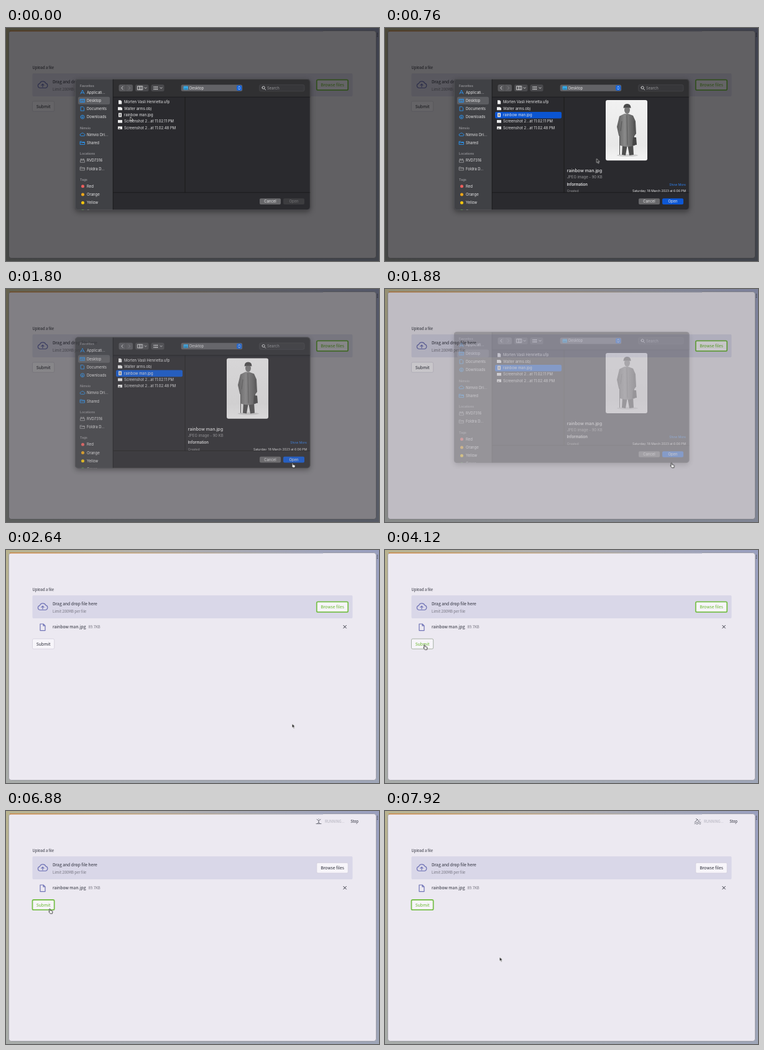
These frames come from a looping animation (600 px wide and 375 px high, 8 s). An HTML page:

```html
<!DOCTYPE html>
<html lang="en">
<head>
<meta charset="utf-8">
<title>File upload</title>
<style>
html, body { margin: 0; width: 100%; height: 100%; overflow: hidden; background: #b4b2ae; }
svg { display: block; width: 100%; height: 100%; }
text { white-space: pre; }

.page text { font: 6.75px "Noto Sans CJK JP", "Noto Sans CJK SC", "Noto Sans CJK", Lato, sans-serif; fill: #282a36; }
.page text.small { font-size: 5.91px; }
.page text.muted { fill: #74737f; }
.line { fill: none; stroke-linecap: round; stroke-linejoin: round; }
.violet { stroke: #6f73b6; stroke-width: 1.2; }
.button { fill: #f7f5fa; stroke: #cecbd8; stroke-width: .7; }

.dialog text { font: 5.95px Inter, "Open Sans", sans-serif; fill: #e6e6e7; }
.dialog text.head { font-size: 5.1px; font-weight: 600; fill: #929296; }
.dialog text.info { font-size: 5px; }
.dialog text.dim { fill: #98989b; }
.blue { stroke: #2c94ee; stroke-width: .9; }
.grey { stroke: #a0a0a3; stroke-width: .8; }
.pale { stroke: #dededf; stroke-width: .9; }

/* One loop is 8 s, so 1% is 80 ms. */
.step { animation: 8s step-end infinite; }
.picked { animation-name: picked; }
.unpicked { animation-name: unpicked; }
.uploaded { animation-name: uploaded; }
.pushed { animation-name: pushed; }
.submit-box { animation-name: submit-box; }
.page .submit-text { animation-name: submit-text; }
.browse-box { animation-name: browse-box; }
.page .browse-text { animation-name: browse-text; }
.running { animation-name: running; }
.arrow { animation-name: arrow; }
.hand { animation-name: hand; }
.shade { animation: shade 8s linear infinite; }
.dialog { animation: dialog 8s linear infinite; }
.cursor { animation: cursor 8s ease-in-out infinite; }
.sport { visibility: hidden; animation: sport .8s step-end infinite; }

@keyframes picked { 0% { visibility: hidden } 4%, 100% { visibility: visible } }
@keyframes unpicked { 0% { visibility: visible } 4%, 100% { visibility: hidden } }
@keyframes uploaded { 0% { visibility: hidden } 28%, 100% { visibility: visible } }
@keyframes pushed { 0% { transform: none } 28%, 100% { transform: translateY(25px) } }
@keyframes submit-box {
  0% { stroke: #cecbd8; stroke-width: .7px }
  50% { stroke: #95a191; stroke-width: .8px }
  56%, 100% { stroke: #79c04b; stroke-width: 1.8px }
}
@keyframes submit-text { 0% { fill: #282a36 } 50%, 100% { fill: #68b82b } }
@keyframes browse-box {
  0% { stroke: #79c04b; stroke-width: 1.8px }
  56%, 100% { stroke: #cecbd8; stroke-width: .7px }
}
@keyframes browse-text { 0% { fill: #68b82b } 56%, 100% { fill: #282a36 } }
@keyframes running { 0% { visibility: hidden; opacity: 0 } 63%, 100% { visibility: visible; opacity: 1 } }
@keyframes sport { 0% { visibility: inherit } 20%, 100% { visibility: hidden } }
@keyframes shade { 0%, 22% { opacity: .59 } 24.25%, 100% { opacity: 0 } }
@keyframes dialog {
  0%, 22% { opacity: 1; transform: none }
  24.25%, 100% { opacity: 0; transform: translateY(-19.5px) }
}
@keyframes cursor {
  0%, 5.5% { transform: translate(200px, 143px); animation-timing-function: ease-in }
  10.5% { transform: translate(402px, 240px); animation-timing-function: ease-out }
  17.5%, 42% { transform: translate(460.3px, 279.7px) }
  51%, 84.5% { transform: translate(63px, 152.5px) }
  93.5%, 100% { transform: translate(184.4px, 235.2px) }
}
@keyframes arrow {
  0% { visibility: visible } 15% { visibility: hidden } 25% { visibility: visible }
  50% { visibility: hidden } 86.5%, 100% { visibility: visible }
}
@keyframes hand {
  0% { visibility: hidden } 15% { visibility: visible } 25% { visibility: hidden }
  50% { visibility: visible } 86.5%, 100% { visibility: hidden }
}
</style>
</head>
<body>
<svg viewBox="0 0 600 375" preserveAspectRatio="none">
  <defs>
    <linearGradient id="desk">
      <stop offset="0" stop-color="#b9b38f"/><stop offset=".35" stop-color="#b2b0ab"/>
      <stop offset="1" stop-color="#999fbf"/>
    </linearGradient>
    <linearGradient id="desk-low" x2="0" y2="1">
      <stop offset="0" stop-color="#a0a8b4" stop-opacity="0"/><stop offset="1" stop-color="#a0a8b4" stop-opacity=".7"/>
    </linearGradient>
    <linearGradient id="strip">
      <stop offset="0" stop-color="#c9823f"/><stop offset=".3" stop-color="#c29a62"/>
      <stop offset=".8" stop-color="#aba9a8"/><stop offset="1" stop-color="#a5a7bb"/>
    </linearGradient>
    <linearGradient id="photo" x2="0" y2="1">
      <stop offset="0" stop-color="#f1f1f1"/><stop offset=".75" stop-color="#e8e8e8"/>
      <stop offset="1" stop-color="#f4f4f4"/>
    </linearGradient>
    <linearGradient id="coat">
      <stop offset="0" stop-color="#5d5d5d"/><stop offset=".4" stop-color="#8a8a8a"/>
      <stop offset="1" stop-color="#505050"/>
    </linearGradient>
    <filter id="shadow" x="-10%" y="-10%" width="120%" height="130%">
      <feDropShadow dx="0" dy="3" stdDeviation="4" flood-opacity=".4"/>
    </filter>
    <clipPath id="panel"><rect x="111" y="82" width="378.500" height="211" rx="5"/></clipPath>
    <clipPath id="content"><rect x="172" y="111" width="318" height="153.500"/></clipPath>
  </defs>

  <g class="page">
    <rect width="600" height="375" fill="url(#desk)"/>
    <rect width="600" height="375" fill="url(#desk-low)"/>
    <rect x="4.500" y="4.500" width="591" height="366" rx="4" fill="#ece9f1" stroke="#8d8d94" stroke-width=".7"/>
    <rect x="6" y="4" width="504" height="1.500" fill="url(#strip)"/>
    <g fill="#44464f"><circle cx="597.500" cy="8.500" r=".8"/><circle cx="597.500" cy="11" r=".8"/><circle cx="597.500" cy="13.500" r=".8"/></g>

    <text class="small" x="42.500" y="65.500">Upload a file</text>
    <rect x="42.500" y="73" width="515" height="37" rx="2" fill="#d9d7e8"/>
    <path class="line violet" d="M54.500 96.500a3.600 3.600 0 0 1-.2-7.100a5.200 5.200 0 0 1 9.700-.5a3.900 3.900 0 0 1-.3 7.600zM59 95v-4.600M57 92.200l2-2 2 2"/>
    <text x="75" y="88.800">Drag and drop file here</text>
    <text class="small muted" x="75" y="100.700">Limit 200MB per file</text>
    <rect class="button step browse-box" x="499.800" y="83.300" width="50.400" height="16.600" rx="2"/>
    <text class="step browse-text" x="525" y="94" text-anchor="middle">Browse files</text>

    <g class="step uploaded">
      <path class="line violet" d="M55 119h5l3 3v7.600h-8zM60 119v3h3"/>
      <text x="75" y="126.400">rainbow man.jpg</text>
      <text class="small muted" x="132.500" y="126.200">89.7KB</text>
      <path class="line" stroke="#30323d" d="M542.800 121.300l4.600 4.600m0-4.600l-4.600 4.600"/>
    </g>

    <g class="step pushed">
      <rect class="button step submit-box" x="42.500" y="118" width="35.200" height="16.200" rx="2"/>
      <text class="step submit-text" x="60.200" y="128.500" text-anchor="middle">Submit</text>
    </g>

    <g class="step running">
      <g class="line" stroke="#6f707b" stroke-width="1" id="sports"></g>
      <text class="small" x="513" y="19" style="fill:#aeadb9">RUNNING...</text>
      <text class="small" x="554.300" y="19">Stop</text>
    </g>
  </g>

  <rect class="shade" width="600" height="375"/>

  <g class="dialog">
    <rect x="111" y="82" width="378.500" height="211" rx="5" fill="#2b2b2d" filter="url(#shadow)"/>
    <g clip-path="url(#panel)">
      <rect x="111" y="82" width="61" height="211" fill="#404145"/>
      <rect x="172" y="82" width="318" height="29" fill="#303032"/>
      <path d="M172 111.200h318M172 264.800h318M288 111v154M172.200 82v211" stroke="#171718" stroke-width=".8"/>
      <rect x="116" y="110.700" width="51" height="12.400" rx="2.500" fill="#5c5d61"/>
      <g id="sidebar"></g>
    </g>
    <rect x="111.300" y="82.300" width="377.900" height="210.400" rx="5" fill="none" stroke="#606063" stroke-width=".6"/>

    <rect x="181.500" y="91" width="22.500" height="11" rx="2.500" fill="#58585b"/>
    <path class="line pale" d="M188 94.200l-2.200 2.300 2.200 2.300"/>
    <path class="line" stroke="#858588" stroke-width=".9" d="M197.500 94.200l2.200 2.300-2.200 2.300"/>
    <path d="M192.800 91v11" stroke="#444446" stroke-width=".6"/>
    <g fill="#49494c"><rect x="208" y="91" width="21.500" height="11" rx="2.500"/><rect x="233.500" y="91" width="21" height="11" rx="2.500"/></g>
    <path class="line pale" d="M211.800 93.700h8v5.600h-8zM214.500 93.700v5.600m2.600-5.600v5.600M223 95.800l1.500 1.500 1.500-1.500M248 95.800l1.500 1.500 1.500-1.500"/>
    <path d="M237.500 95h7M237.500 98.300h7" stroke="#dededf" stroke-width="1.700" stroke-dasharray="1.700 .8"/>
    <rect x="281.700" y="91.300" width="98.500" height="10.400" rx="2.500" fill="#626266"/>
    <rect x="285.500" y="93.500" width="7.500" height="6" rx="1" fill="#36a7e4"/>
    <path d="M286.500 98h5.500" stroke="#176c9f"/>
    <text x="295" y="98.600">Desktop</text>
    <rect x="371" y="92.300" width="8.300" height="8.400" rx="2" fill="#1463db"/>
    <path class="line" stroke="#fff" stroke-width=".8" d="M373.700 95.500l1.500-1.500 1.500 1.500M373.700 97.500l1.500 1.500 1.500-1.500"/>
    <rect x="407.500" y="91.300" width="72.500" height="10.500" rx="2.500" fill="#37373a" stroke="#4b4b4e" stroke-width=".6"/>
    <path class="line pale" d="M412 96a2.100 2.100 0 1 0 4.200 0a2.100 2.100 0 1 0-4.200 0M415.700 97.700l1.900 1.900"/>
    <text class="dim" x="420" y="98.700">Search</text>

    <rect class="step picked" x="177" y="135" width="107" height="10.600" rx="2" fill="#0b55d1"/>
    <g id="files"></g>

    <g class="step picked" clip-path="url(#content)">
      <rect x="355" y="116" width="67" height="97.200" rx="3" fill="url(#photo)"/>
      <ellipse cx="390" cy="205" rx="17" ry="2" fill="#cfcfcf"/>
      <path d="M382 186l-1 18 6 1 3-18 3 18 7-1-1-18z" fill="#4d4d4d"/>
      <path d="M385 138l-8 4-4 17 3 14 2 2v14q11 4 24 0l-1-15 3-4-1-20-4-9-8-3z" fill="url(#coat)"/>
      <path d="M389 140l1 48M381 150l-2 16M400 150l1 16" stroke="#4f4f4f" stroke-width=".8"/>
      <ellipse cx="389.500" cy="132" rx="4.500" ry="6" fill="#777"/>
      <path d="M383.500 129q0-7 6-7t6 7q-6-2-12 0z" fill="#4a4a4a"/>
      <path d="M377.500 172v32" stroke="#555"/>
      <path d="M399 176l5 0 1 12-7 1z" fill="#444"/>
      <text x="292.700" y="232.300" style="font-size:7.100px;font-weight:500">rainbow man.jpg</text>
      <text class="dim" x="292.700" y="242.200">JPEG image - 90 KB</text>
      <text x="292.700" y="253.600" style="font-weight:600">Information</text>
      <text class="info" x="484" y="253.600" text-anchor="end" style="fill:#2e80ee">Show More</text>
      <text class="info dim" x="292.700" y="264">Created</text>
      <text class="info" x="484" y="264" text-anchor="end">Saturday, 18 March 2023 at 6:06 PM</text>
    </g>

    <rect x="408" y="274.300" width="34" height="9.600" rx="2" fill="#67676a"/>
    <text x="425" y="281.200" text-anchor="middle">Cancel</text>
    <g class="step unpicked">
      <rect x="446" y="274.300" width="34" height="9.600" rx="2" fill="#3c3c3f"/>
      <text x="463" y="281.200" text-anchor="middle" style="fill:#737376">Open</text>
    </g>
    <g class="step picked">
      <rect x="446" y="274.300" width="34" height="9.600" rx="2" fill="#0d57d4"/>
      <text x="463" y="281.200" text-anchor="middle">Open</text>
    </g>
  </g>

  <g class="cursor" stroke-linejoin="round">
    <path class="step arrow" d="M0 0v6.300l1.500-1.300 1.100 2.500 1.100-.5-1.100-2.400h2z" fill="#111" stroke="#fff" stroke-width=".6"/>
    <path class="step hand" d="M-.3.700q.8-1 1.500 0l.5 2.300 2.500.6q.9.300.8 1.400l-.5 2.800h-3.300l-2.300-2.900q0-1 1.200-.3z" fill="#fff" stroke="#111" stroke-width=".8"/>
  </g>
</svg>
<script>
const fill = (id, parts) => { document.getElementById(id).innerHTML = parts.join(''); };
const label = (x, y, text, cls = '') => `<text class="${cls}" x="${x}" y="${y}">${text}</text>`;
const stroke = (y, d, cls) => `<path class="line ${cls}" transform="translate(123 ${y})" d="${d}"/>`;
const dot = (y, color) => `<circle cx="123.500" cy="${y}" r="2.500" fill="${color}"/>`;

const icon = {
  apps: 'M-3 2.500l3-6 3 6M-2 .8h4',
  desktop: 'M-3.500-2.500h7v5h-7zM-3.500-1h7M-2 1.200h4',
  page: 'M-2.500-3.200h3.500l1.600 1.600v4.800h-5.100z',
  down: 'M-3 0a3 3 0 1 0 6 0a3 3 0 1 0-6 0M0-1.600v3M-1.200.3l1.200 1.200 1.200-1.200',
  cloud: 'M-2.200 2a1.700 1.700 0 0 1 0-3.400a2.600 2.600 0 0 1 4.700.3a1.500 1.500 0 0 1 0 3.100z',
  folder: 'M-3.500-2.500h2.500l1 1h3.500v4h-7zM-3.500-.5h7',
  people: 'M-3.500 2.600v-3h7v3zM-2.500-2.500h1.400v1.400h-1.400zM1-2.500h1.400v1.400h-1.400z'
};

const heads = [['Favorites', 93], ['Nimvio', 161], ['Locations', 202.500], ['Tags', 244]];
const places = [
  ['Applicati…', 103.500, 'apps'], ['Desktop', 117, 'desktop'], ['Documents', 130, 'page'],
  ['Downloads', 143.200, 'down'], ['Nimvio Dri...', 171.700, 'cloud'], ['Shared', 185, 'folder'],
  ['RVD7316', 213.200, 'people', 'grey'], ['Foldra D...', 226.400, 'folder', 'grey']
];
const tags = [['Red', 254.800, '#ec5f5d'], ['Orange', 268, '#eba51b'], ['Yellow', 281.300, '#f4c50f'], ['Green', 294.500, '#5fbf4c']];
fill('sidebar', [
  ...heads.map(([name, y]) => label(119, y + 1.8, name, 'head')),
  ...places.map(([name, y, kind, tone = 'blue']) => stroke(y, icon[kind], tone) + label(130, y + 2.1, name)),
  ...tags.map(([name, y, color]) => dot(y, color) + label(130, y + 2.1, name))
]);

const docIcon = 'M181-3h3.500l1.700 1.700v4.500h-5.200z';
const shotIcon = 'M180-2.300h7v4.600h-7z';
const files = [
  ['Morten Vasli Henrietta.ufp', docIcon], ['Walter arms.obj', 'M180-2.500h5l2 1.500v3.500h-7z'],
  ['rainbow man.jpg', 'M181-3.300h5v6.600h-5z'],
  ['Screenshot 2...at 11.02.11 PM', shotIcon], ['Screenshot 2...at 11.02.48 PM', shotIcon]
];
fill('files', files.map(([name, d], i) => {
  const y = 119.3 + i * 10.36;
  const detail = i === 2 ? '<path d="M183.500-2v4" stroke="#555" stroke-width="1.500"/>'
    : i === 4 ? '<path d="M181 1h3" stroke="#444"/>' : '';
  return `<g transform="translate(0 ${y})"><path d="${d}" fill="#ededed"/>${detail}</g>` + label(190, y + 2.1, name);
}));

// Pictograms around (0, 0), 160 ms each.
const sports = [
  'M-5 2a2 2 0 1 0 4 0a2 2 0 1 0-4 0M1 2a2 2 0 1 0 4 0a2 2 0 1 0-4 0M-3 2l2-3 2 2v2M-1-1l2-2 2 2h1M2-4.500v.1',
  'M1.500-4.500v.2M.8-2.500l-1.800 3 2 1.500-.5 3M-1 .5l-1 2.500h-2M.8-2.500l-3-.2-1.500 2M.8-2.500l1.500 2 2-.3',
  'M0-4.500v.2M0-2.500v3l-2 4M0 .5l2 2v2M0-2.500l-2 2M0-2.500l2.500 2',
  'M-4 4h8M-3-3l3 2 3-2M0-1v2.500l-2 2.500M0 1.500l2 2.500M0-4v.1',
  'M-5 4q1.300-1.500 2.500 0t2.500 0 2.500 0 2.500 0M-5 1.500q1.300-1.500 2.500 0t2.500 0 2.500 0 2.500 0M-3-.5l3-2-2.500-1.500M0-2.500l2.500 2.500M3.500-2.500v.2'
];
fill('sports', sports.map((d, i) =>
  `<path class="sport" style="animation-delay:${i * 160 - 800}ms" transform="translate(503 16.500)" d="${d}"/>`));
</script>
</body>
</html>
```
